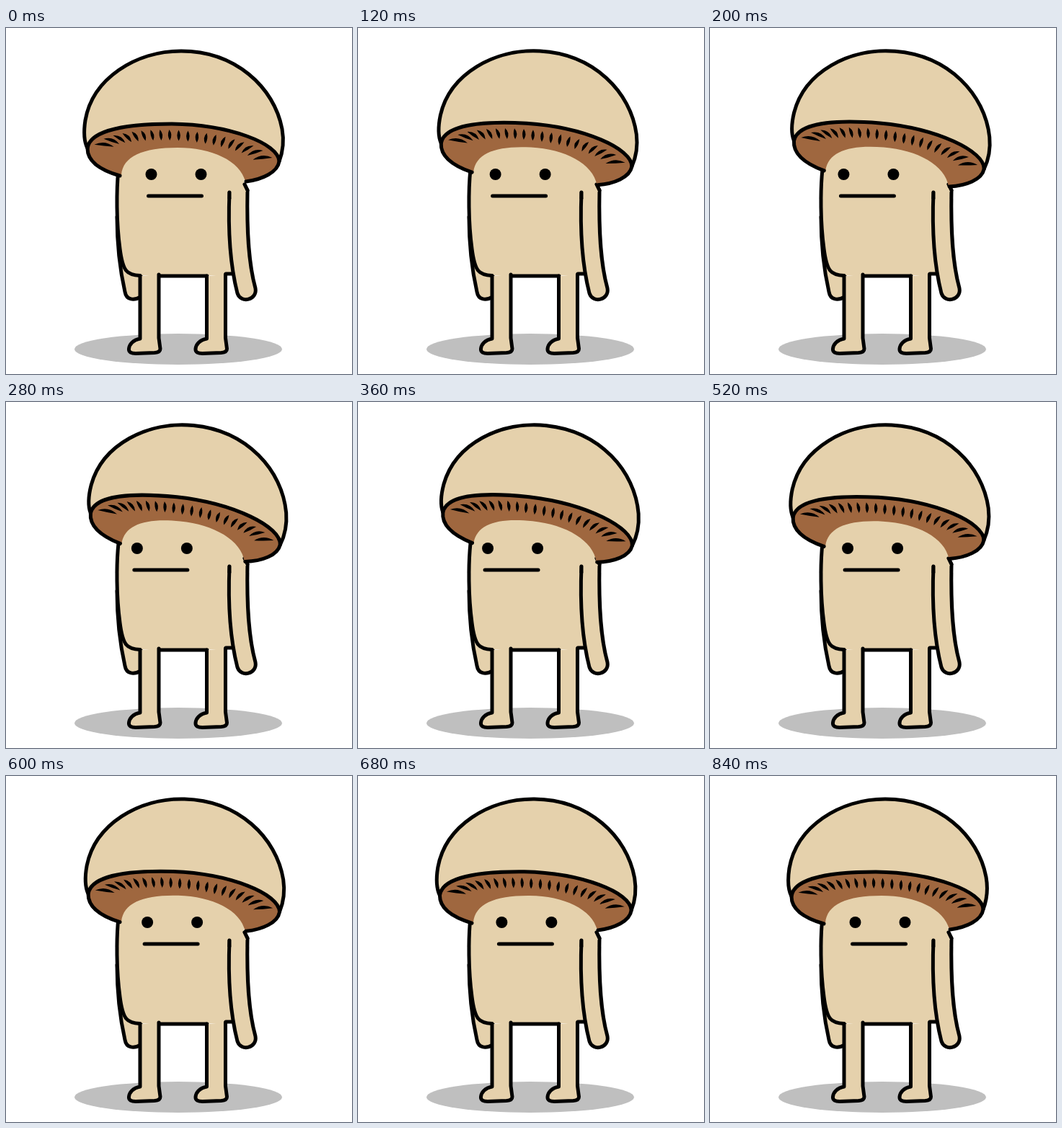
Recreate the animation shown at these times as an HTML page. Size 480 by 480 pixels, loop 0.88 s.

```html
<!DOCTYPE html>
<html>
<head>
<meta charset="utf-8">
<style>
  html, body { margin: 0; width: 100%; height: 100%; overflow: hidden; background: #fff; }
  svg { display: block; width: 100vw; height: 100vh; }
  .line { stroke: #000; stroke-width: 5; stroke-linecap: round; stroke-linejoin: round; }
  .skin { fill: #e5d1ac; }
  .none { fill: none; }
</style>
</head>
<body>
<svg viewBox="0 0 480 480">
  <ellipse cx="239" cy="445.5" rx="144" ry="21.5" fill="#bfbfbf"/>

  <!-- far arm, body, legs -->
  <path class="line skin" d="M154 262C154 300 158 335 165 366C167 378 178 378 187 373V335"/>
  <path class="skin" d="M157 195L160 160H326L331 208L313 343H186C160 341 155 300 155 250Z"/>
  <path class="line none" d="M156 196C153 225 153 270 158 306C162 338 168 343 186 343.5M212 344H279M305 341H313"/>
  <path id="leg" class="line skin" d="M186 344V431C176 433 171 439 170.500 445C170 450 174 451.500 180 451.500L206 450.500Q214 450 214 445L212 430V342"/>
  <use href="#leg" x="92.5"/>

  <!-- near arm -->
  <path class="line skin" d="M331 217L335 225C334 280 336 325 346 361C349 377 326 383 321 368C310 325 308 275 310 228"/>
  <path class="skin" d="M307 215H328L333 227L312 236Z"/>
  <path class="line none" d="M310 228V236M331 217L335 225"/>

  <g id="cap">
    <path fill="#9f673f" d="M113 167C116 141 170 133 230 133C310 134 378 160 379 185C377 200 356 210 332 213C325 184 285 166 238 166C190 166 162 178 160 204L158 205C130 197 113 185 113 167Z"/>
    <path id="gills"/>
    <path class="line none" d="M113 167C113 185 130 197 158 205M379 185C377 200 356 210 333 213"/>
    <path class="line skin" d="M113 167C108 157 108 141 110 128C120 70 180 32 243 32C318 32 372 82 383 140C386 157 384 172 379 185C378 160 310 134 230 133C170 133 116 141 113 167Z"/>
  </g>

  <g id="face">
    <circle cx="201.5" cy="203" r="8"/>
    <circle cx="270.5" cy="203" r="8"/>
    <path class="line" d="M197.500 233H271.500"/>
  </g>
</svg>
<script>
const byId = id => document.getElementById(id);

// A pointed sliver fanning out from the stem to the rim; s runs from -1 (left) to 1 (right).
function gillPath(s) {
  const x = 246 + 130 * s;
  const y = 184 - 42 * Math.sqrt(1 - s * s) + 9.5 * s;
  const dx = -30 * s * Math.abs(s), dy = 15 * (1 - s ** 4);
  const len = Math.hypot(dx, dy);
  const side = k => `${dx / 2 + dy / len * k} ${dy / 2 - dx / len * k}`;
  const bend = -4 * s;
  return `M${x} ${y}q${side(bend + 4.5)} ${dx} ${dy}Q${x + dx / 2 + dy / len * (bend - 4.5)} ${y + dy / 2 - dx / len * (bend - 4.5)} ${x} ${y}Z`;
}

const GILLS = 20;
const gills = Array.from({ length: GILLS }, (_, i) => gillPath(-0.95 + 1.9 * i / (GILLS - 1)));
byId('gills').setAttribute('d', gills.join(''));

const STEP = 40, STEPS = 22, TURN = 10;

// 0 = facing right, 1 = facing left; eases out in both directions.
function turnAmount(step) {
  return step <= TURN
    ? 1 - (1 - step / TURN) ** 1.95
    : ((STEPS - 1 - step) / (STEPS - 1 - TURN)) ** 2.3;
}

function draw() {
  const turn = turnAmount(Math.floor(performance.now() / STEP) % STEPS);
  byId('cap').setAttribute('transform', `rotate(${6.2 * turn} 246 205)`);
  byId('face').setAttribute('transform', `translate(${-21.7 * turn} 0)`);
  requestAnimationFrame(draw);
}
draw();
</script>
</body>
</html>
```
